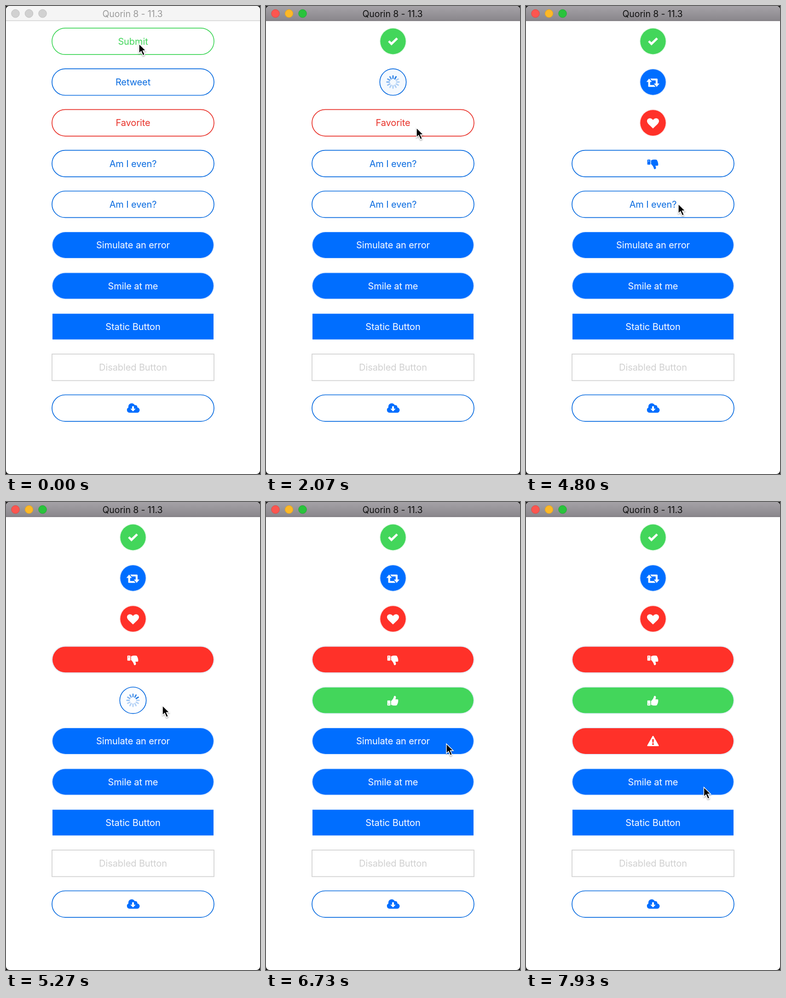
Animation of 552x1014 px, one loop 8000 ms. Source, as an HTML page:

```html
<!DOCTYPE html>
<html lang="en">
<head>
<meta charset="utf-8">
<title>Animated buttons</title>
<style>
  html, body { margin: 0; width: 100%; height: 100%; overflow: hidden; background: #161616; }
  svg { display: block; width: 552px; height: 1014px; }
  text { font: 20px Inter, "Open Sans", sans-serif; text-anchor: middle; letter-spacing: -.1px; }
  #title { font-size: 19.5px; }
</style>
</head>
<body>
<svg id="stage" viewBox="0 0 552 1014">
  <defs>
    <linearGradient id="bar" x2="0" y2="1">
      <stop stop-color="#a5a2a7"/><stop offset="1" stop-color="#89868b"/>
    </linearGradient>
    <clipPath id="window"><rect width="552" height="1014" rx="8"/></clipPath>
    <filter id="shadow" x="-50%" y="-50%" width="200%" height="200%">
      <feDropShadow dx="0" dy="2" stdDeviation="1.5" flood-opacity=".35"/>
    </filter>
  </defs>
  <g clip-path="url(#window)">
    <rect width="552" height="1014" fill="#fff"/>
    <rect id="titlebar" width="552" height="32"/>
    <rect id="divider" y="31" width="552" height="1.5"/>
    <g id="lights"></g>
    <text id="title" x="275" y="23.5">Quorin 8 - 11.3</text>
  </g>
  <g id="rows"></g>
  <path id="cursor" d="M0 0V20.5L4.7 16.2L8.6 25L12.4 23.3L8.5 14.7H15Z" fill="#000" stroke="#fff"
    stroke-width="1.4" filter="url(#shadow)"/>
</svg>
<script>
const LOOP = 8000;
const WHITE = [255, 255, 255], BLUE = [0, 110, 255], RED = [255, 49, 41], GREEN = [67, 214, 91];
const LINE_BLUE = [10, 108, 224], LINE_RED = [232, 50, 42], GREY = [208, 208, 208];

const thumb = `<rect x="-12" y="-.5" width="6.6" height="11" rx="1.2"/>
  <path d="M-4 1C-1-2 1.5-5 2-8C2.4-11.4 7.2-11.2 6.7-6.5L5.5-2.8H10Q12.6-2.3 11.4.6Q12.2 2.4 10.9 4Q11.2 6 9.8 7Q9.5 10.4 6 10.5H1.5Q-1 10.4-4 8.8Z"/>
  <circle class="hole" cx="-8.8" cy="7.5" r="1"/>`;
const arrow = `<path d="M-14.2-1.8L-8.2-9L-2.2-1.8H-6V5H2.6L5.8 9H-8.6Q-10.2 9-10.2 7.4V-1.8Z"/>`;

const icons = {
  check: `<path d="M-10.8 1.2L-7.6-2L-3.4 2.1L7.4-8.2L10.8-4.8L-3.4 8.9Z"/>`,
  repeat: `<g transform="translate(-.2 1.5)">${arrow}<g transform="rotate(180)">${arrow}</g></g>`,
  heart: `<path transform="translate(0 .8)" d="M0 11.5C-3 8-13 1-13-4.5C-13-11-4-13-0-6.7C4-13 13-11 13-4.5C13 1 3 8 0 11.5Z"/>`,
  up: `<g transform="translate(-.3 .7)">${thumb}</g>`,
  down: `<g transform="translate(-.3 1.8) scale(1 -1)">${thumb}</g>`,
  warning: `<path d="M0-10L11.3 9.8H-11.3Z" stroke="currentColor" stroke-width="2.6" stroke-linejoin="round"/>
    <path class="hole" d="M-1.8-4H1.8L1.3 3.4H-1.3Z"/><circle class="hole" cy="6.6" r="2"/>`,
  cloud: `<path d="M-7.5 10A6 6 0 0 1-10-1.3A7.4 7.4 0 0 1 3.8-6.4A4.5 4.5 0 0 1 9.4-1.1A5.5 5.5 0 0 1 8.5 10Z"/>
    <path class="hole" d="M-2-4H2V1.2H5.8L0 7.2L-5.8 1.2H-2Z"/>`
};

const rows = [
  { label: "Submit", line: GREEN, fill: GREEN, icon: "check", click: 450, shrink: true },
  { label: "Retweet", line: LINE_BLUE, fill: BLUE, icon: "repeat", click: 1750, shrink: true },
  { label: "Favorite", line: LINE_RED, fill: RED, icon: "heart", click: 2830, shrink: true },
  { label: "Am I even?", line: LINE_BLUE, fill: RED, icon: "down", click: 3700, shrink: true, expand: true },
  { label: "Am I even?", line: LINE_BLUE, fill: GREEN, icon: "up", click: 4855, shrink: true, expand: true },
  { label: "Simulate an error", line: BLUE, fill: RED, icon: "warning", click: 6770, solid: true },
  { label: "Smile at me", line: BLUE, fill: BLUE, solid: true },
  { label: "Static Button", line: BLUE, fill: BLUE, solid: true, square: true },
  { label: "Disabled Button", line: GREY, fill: GREY, square: true },
  { label: "", line: LINE_BLUE, fill: BLUE, icon: "cloud", iconOnly: true }
];

// time, x, y
const cursorPath = [
  [0, 289, 82], [600, 289, 82], [1450, 314, 172], [1820, 314, 172], [2070, 327, 264], [2950, 327, 264],
  [3450, 334, 371], [3600, 334, 362], [3850, 334, 362], [4600, 331, 429], [5100, 331, 429],
  [6000, 427, 558], [6100, 427, 558], [6550, 392, 524], [6880, 392, 524], [7230, 386.5, 618], [LOOP, 386.5, 618]
];

const $ = id => document.getElementById(id);
const ramp = (t, a, b) => Math.min(1, Math.max(0, (t - a) / (b - a)));
const ease = (t, a, b) => { const p = ramp(t, a, b); return p * p * (3 - 2 * p); };
const mix = (a, b, p) => a.map((v, i) => v + (b[i] - v) * p);
const css = (c, alpha = 1) => `rgba(${c.map(Math.round)},${alpha})`;
const set = (el, attrs) => { for (const k in attrs) el.setAttribute(k, attrs[k]); };

const spokes = Array.from({ length: 12 }, (_, i) =>
  `<path d="M0-8V-13.3" transform="rotate(${i * 30})"/>`).join("");

$("lights").innerHTML = [20.5, 50, 79.5].map(x => `<circle cx="${x}" cy="16.3" r="8.7"/>`).join("");
$("rows").innerHTML = rows.map((row, i) => `<g transform="translate(276 ${76.5 + i * 88.3})">
  <rect class="fill"/><rect class="outline" fill="none" stroke-width="1.7"/>
  <text class="label" y="7.3">${row.label}</text>
  <g class="spinner" stroke-width="2.9" stroke-linecap="round">${spokes}</g>
  <g class="icon" fill="currentColor">${icons[row.icon] || ""}</g></g>`).join("");

rows.forEach((row, i) => {
  const group = $("rows").children[i];
  for (const part of ["fill", "outline", "label", "spinner", "icon"]) row[part + "El"] = group.querySelector("." + part);
  row.holes = [...group.querySelectorAll(".hole")];
});

const box = (half, height, square) =>
  ({ x: -half, y: -height, width: half * 2, height: height * 2, rx: square ? 0 : height });

function drawRow(row, t) {
  const e = row.click === undefined ? -1 : t - row.click;
  const done = row.expand ? 820 : 1000;
  const narrow = row.shrink ? ease(e, 0, 230) - (row.expand ? ease(e, 840, 1070) : 0) : 0;
  const half = 176 - narrow * 147.3;
  const finish = row.solid ? ramp(e, 1020, 1150) : ramp(e, 1110, 1260);
  const filled = row.solid ? 1 : finish;
  const fillColor = row.solid ? mix(row.line, row.fill, finish) : row.fill;
  const tint = e > 0 ? .15 * (1 - ramp(e, 0, 450)) : 0;

  set(row.fillEl, {
    ...box(half - 1 + (1 - filled) * .5, 27.9, row.square),
    fill: filled ? css(fillColor, filled) : css(row.line, tint)
  });
  set(row.outlineEl, {
    ...box(half, 28.7, row.square),
    stroke: css(row.line, row.square && row.solid ? 0 : 1 - filled * .88)
  });

  const ink = mix(row.line, WHITE, filled);
  set(row.labelEl, { fill: css(ink), opacity: 1 - ramp(e, 0, 120) });

  set(row.spinnerEl, { stroke: css(ink), opacity: ramp(e, 140, 200) * (1 - ramp(e, done - 60, done)) });
  const head = Math.floor(Math.max(0, e - 200) * 12 / 1000);
  [...row.spinnerEl.children].forEach((spoke, i) => {
    const age = ((head - i) % 12 + 12) % 12;
    set(spoke, { opacity: Math.max(.3, .9 - age * .1) });
  });

  const iconInk = mix(row.solid ? row.line : BLUE, WHITE, filled);
  const ownInk = row.line === LINE_BLUE ? iconInk : ink;
  set(row.iconEl, { color: css(ownInk), opacity: row.iconOnly ? 1 : ramp(e, done, done + 80) });
  const hole = css(mix(WHITE, fillColor, filled));
  row.holes.forEach(el => set(el, { fill: hole }));
}

function drawWindow(active) {
  set($("titlebar"), { fill: active ? "url(#bar)" : "#f5f5f5" });
  set($("divider"), { fill: active ? "#747176" : "#d2d2d2" });
  set($("title"), { fill: active ? "#111" : "#9b9b9b" });
  const colors = active ? ["#fc5650", "#fdb827", "#29c33c"] : Array(3).fill("#d1d1d1");
  const edges = active ? ["#df4642", "#dda021", "#20a931"] : Array(3).fill("#bdbdbd");
  [...$("lights").children].forEach((el, i) => set(el, { fill: colors[i], stroke: edges[i] }));
}

function drawCursor(t) {
  const next = Math.max(1, cursorPath.findIndex(p => p[0] > t));
  const [t0, x0, y0] = cursorPath[next - 1], [t1, x1, y1] = cursorPath[next];
  const p = ease(t, t0, t1);
  set($("cursor"), { transform: `translate(${x0 + (x1 - x0) * p} ${y0 + (y1 - y0) * p})` });
}

const start = performance.now();
function render(now) {
  const t = Math.max(0, now - start) % LOOP;
  drawWindow(t >= 400);
  rows.forEach(row => drawRow(row, t));
  drawCursor(t);
  requestAnimationFrame(render);
}
render(start);
</script>
</body>
</html>
```
